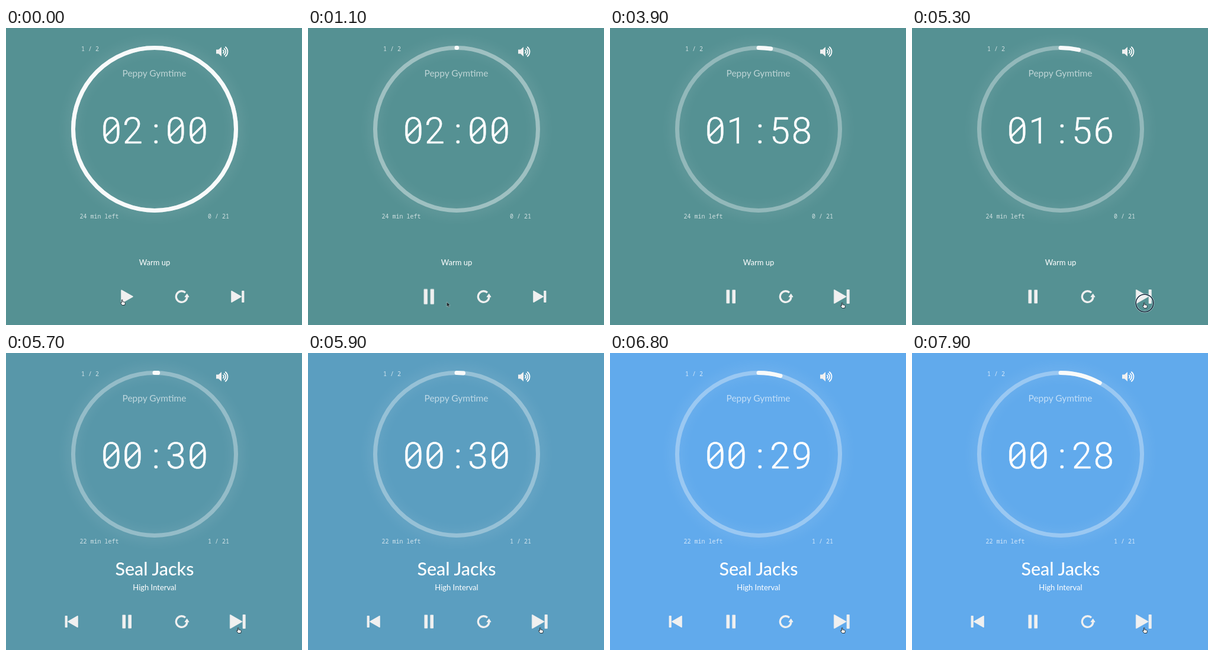
An HTML page that plays this animation: 500 by 502 pixels, repeating every 8 s.

```html
<!DOCTYPE html>
<html lang="en">
<head>
<meta charset="utf-8">
<title>Workout timer</title>
<style>
  html, body { margin: 0; width: 100%; height: 100%; overflow: hidden; }
  body { background: #559193; }
  svg { display: block; width: 100%; height: 100%; fill: #fff; }
  body, svg * { animation: 8s linear infinite paused; }
  body { animation-name: backdrop; }

  text { font-family: Lato, sans-serif; }
  .mono text { font: 300 10px "Noto Sans Mono", monospace; fill-opacity: .72; white-space: pre; }
  #clock { stroke: #fff; }
  #clock text { font: 300 61px Roboto, sans-serif; text-anchor: middle; font-feature-settings: "tnum"; stroke-width: .6; }
  #clock path { stroke-width: 3.6; }
  .mid { text-anchor: middle; }
  .line { fill: none; stroke: #fff; }
  .icons { fill: #f0f0f0; stroke: #f0f0f0; stroke-width: 1.6; stroke-linejoin: round; }

  .warm { animation-name: warm; }
  .high { animation-name: high; }
  .track { animation-name: track; }
  .arc { stroke-dasharray: 360 400; animation-name: arc; }
  .play { animation-name: play; }
  .pause { animation-name: pause; }
  .next { animation-name: next; }
  .pause, .click { transform-box: fill-box; transform-origin: center; }
  .cursor { animation-name: cursor; }
  .hand { animation-name: hand; }
  .arrow { animation-name: arrow; }
  .click { animation-name: click; }

  @keyframes backdrop {
    0%, 68.75% { background: #559193; }
    78.75%, 100% { background: #61aaec; }
  }
  @keyframes warm { 0%, 68.74% { opacity: 1; } 68.75%, 100% { opacity: 0; } }
  @keyframes high { 0%, 68.74% { opacity: 0; } 68.75%, 100% { opacity: 1; } }
  @keyframes track { 0%, 12.5% { opacity: .45; } 16%, 100% { opacity: .33; } }
  /* 3 degrees per second for the warm up, 12 for the interval */
  @keyframes arc {
    0%, 12.49% { stroke-dashoffset: 0; }
    12.5% { stroke-dashoffset: 360; }
    68.74% { stroke-dashoffset: 346.5; }
    68.75% { stroke-dashoffset: 360; }
    100% { stroke-dashoffset: 330; }
  }
  @keyframes play { 0%, 12.3% { opacity: 1; } 12.31%, 100% { opacity: 0; } }
  @keyframes pause {
    0%, 12.3% { opacity: 0; transform: scale(1.18); }
    12.31%, 13% { opacity: 1; transform: scale(1.18); }
    15%, 100% { opacity: 1; transform: none; }
  }
  @keyframes next {
    0%, 17.2% { transform: none; }
    19.5%, 100% { transform: scale(1.2); }
  }
  @keyframes cursor {
    0% { transform: translate(196px, 459px); }
    11.75% { transform: translate(196px, 459px); animation-timing-function: ease-in; }
    13.75% { transform: translate(234.5px, 463px); animation-timing-function: cubic-bezier(.2, .4, .5, 1); }
    18.25%, 100% { transform: translate(392px, 464px); }
  }
  @keyframes hand {
    0%, 13% { opacity: 1; }
    13.01%, 17.2% { opacity: 0; }
    17.21%, 100% { opacity: 1; }
  }
  @keyframes arrow {
    0%, 13% { opacity: 0; }
    13.01%, 17.2% { opacity: 1; }
    17.21%, 100% { opacity: 0; }
  }
  @keyframes click {
    0%, 8.99% { opacity: 0; transform: scale(.4); }
    9% { opacity: 1; transform: scale(.4); }
    10.25% { opacity: 1; transform: none; }
    11.5%, 64.99% { opacity: 0; transform: scale(1.05); }
    65% { opacity: 1; transform: scale(.4); }
    66.25% { opacity: 1; transform: none; }
    67.5%, 100% { opacity: 0; transform: scale(1.05); }
  }
</style>
</head>
<body>
<svg viewBox="0 0 500 502">
  <defs>
    <filter id="blur" x="-20%" y="-20%" width="140%" height="140%"><feGaussianBlur stdDeviation="9"/></filter>
    <path id="skip" d="M-10 -9.2V9.2L6 0ZM8 -9.2h2.6v18.4h-2.6Z"/>
  </defs>

  <g class="line" stroke-width="7">
    <circle cx="251" cy="171" r="140" stroke-width="18" opacity=".07" filter="url(#blur)"/>
    <circle class="track" cx="251" cy="171" r="137.5"/>
    <circle class="arc" cx="251" cy="171" r="137.5" pathLength="360" stroke="#f8fafa"
      stroke-linecap="round" transform="rotate(-90 251 171)"/>
  </g>

  <text class="mid" x="250.5" y="81.5" font-size="15.5" fill-opacity=".62">Peppy Gymtime</text>
  <g id="clock"></g>

  <g class="mono">
    <text x="127" y="39">1 / 2</text>
    <g class="warm">
      <text x="124.5" y="322">24 min left</text>
      <text x="341" y="322">0 / 21</text>
    </g>
    <g class="high">
      <text x="124.5" y="322">22 min left</text>
      <text x="341" y="322">1 / 21</text>
    </g>
  </g>

  <text class="warm mid" x="251" y="401" font-size="13">Warm up</text>
  <g class="high mid">
    <text x="251" y="376" font-size="30.5" font-weight="500">Seal Jacks</text>
    <text x="251" y="401" font-size="13">High Interval</text>
  </g>

  <g fill="#f0f0f0">
    <path d="M355 36.5h4l5-4.5v16l-5-4.5h-4Z"/>
    <path class="line" stroke="#f0f0f0" stroke-width="1.8" stroke-linecap="round"
      d="M366.8 37.6a3.2 3.2 0 0 1 0 4.8M368.8 34.8a7 7 0 0 1 0 10.4M370.8 32.2a10.2 10.2 0 0 1 0 15.6"/>
  </g>

  <g class="icons">
    <g class="high"><use href="#skip" transform="translate(111 454) scale(-1 1)"/></g>
    <path class="play" d="M195 443.3v21.4l19-10.7Z"/>
    <path class="pause" d="M197.3 443.3h4v21.4h-4ZM207.2 443.3h4v21.4h-4Z"/>
    <path fill="none" stroke-width="3.3" d="M303 447.3A9.3 9.3 0 1 0 305.9 455"/>
    <path stroke-width="1" d="M302 454.6h7l-3.3-5.2Z"/>
    <g transform="translate(391 454)"><g class="next"><use href="#skip"/></g></g>
  </g>

  <g class="cursor">
    <g class="click" fill="none">
      <circle cx="1" cy="1" r="14.8" stroke="#fff" stroke-width="3" opacity=".6"/>
      <circle cx="1" cy="1" r="14.8" stroke="#0d2136" stroke-width="1.6"/>
    </g>
    <path class="hand" stroke="#15232c" stroke-width=".9" stroke-linejoin="round"
      d="M-.6 .6q.8-1 1.5 0v3l3.6 .9q1 .4.8 1.6l-.7 3.4h-4.4l-2.8-3.6q0-1.2 1.2-.8l.8 .7Z"/>
    <path class="arrow" fill="#10181c" stroke="#dfe9e9" stroke-width=".5"
      d="M0 0v8l1.8-1.6 1.3 2.8 1.4-.6-1.3-2.8h2.4Z"/>
  </g>
</svg>

<script>
  const LOOP = 8000, START = 1000, SKIP = 5500;
  const clock = document.getElementById("clock");

  function add(tag, attrs) {
    const node = document.createElementNS("http://www.w3.org/2000/svg", tag);
    for (const key in attrs) node.setAttribute(key, attrs[key]);
    return clock.appendChild(node);
  }

  const cells = [178, 214, 253.5, 287, 324].map(x => ({
    glyph: add("text", { x, y: 194.5 }),
    slash: add("path", { d: `M${x - 10} 183l20 -20` })
  }));

  function secondsLeft(t) {
    if (t < START) return 120;
    return t < SKIP ? Math.ceil(120 - (t - START) / 1000) : Math.ceil(30 - (t - SKIP) / 1000);
  }

  // The keyframes are held paused and moved by the same clock as the countdown.
  const motions = document.getAnimations();

  function draw(t) {
    motions.forEach(motion => motion.currentTime = t);
    const left = secondsLeft(t);
    const pad = n => String(n).padStart(2, "0");
    const label = pad(Math.floor(left / 60)) + ":" + pad(left % 60);
    cells.forEach(({ glyph, slash }, i) => {
      glyph.textContent = label[i];
      slash.style.display = label[i] === "0" ? "" : "none";
    });
  }

  draw(0);
  requestAnimationFrame(start => {
    requestAnimationFrame(function tick(now) {
      draw((now - start) % LOOP);
      requestAnimationFrame(tick);
    });
  });
</script>
</body>
</html>
```
